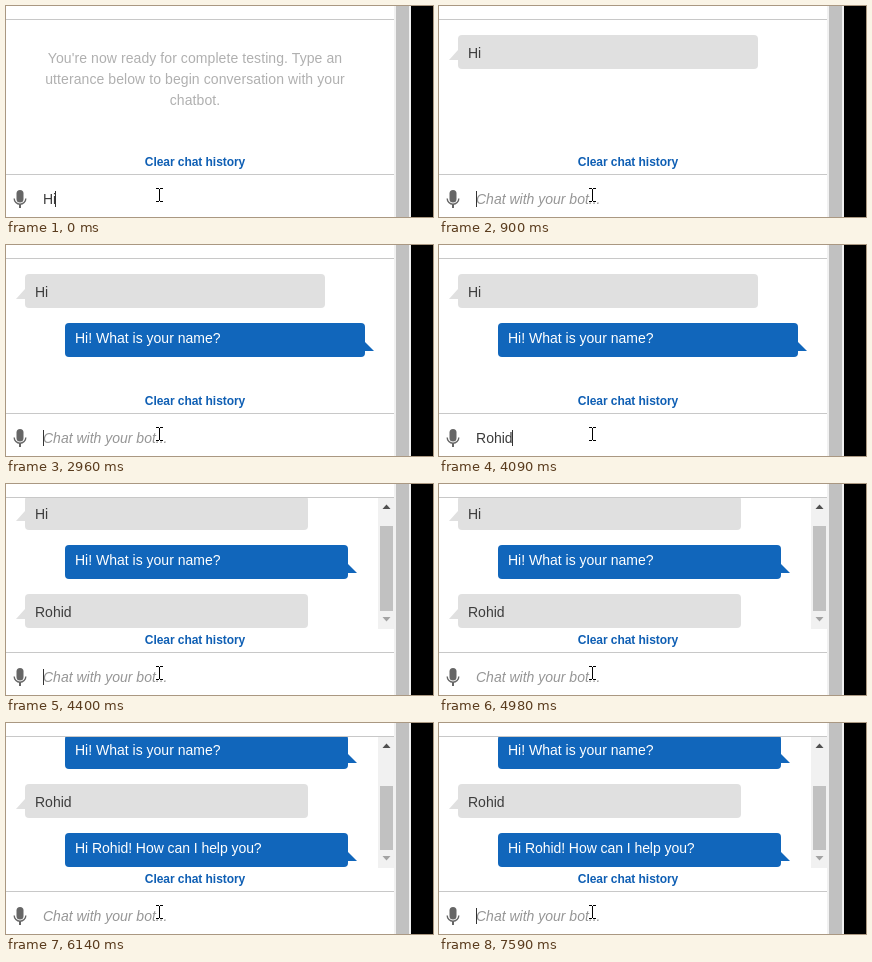
An HTML page that plays this animation: 427x211 px, repeating every 8 s.

```html
<!DOCTYPE html>
<html lang="en">
<head>
<meta charset="utf-8">
<title>Chat test</title>
<style>
html, body { margin: 0; width: 100%; height: 100%; overflow: hidden; background: #fff; }
body { position: relative; font: 14px/16px Arial, "Liberation Sans", sans-serif; color: #3c3c3c; }
div, svg { position: absolute; }
.anim { animation: 8s step-end infinite; }

.rule { left: 0; width: 388px; height: 1px; background: #c8c8c8; }
.intro { left: 0; top: 42px; width: 378px; line-height: 21px; text-align: center; color: #b0b0b0; letter-spacing: .08px; animation-name: until900; }
.link { left: 0; top: 149px; width: 378px; text-align: center; font-size: 12px; line-height: 14px; font-weight: bold; color: #0f5fb4; letter-spacing: -.05px; }

/* conversation */
.view { left: 0; top: 14px; width: 388px; height: 131px; overflow: hidden; }
.list { left: 0; top: -14px; width: 388px; height: 230px; animation-name: scroll; }
.msg { height: 34px; border-radius: 4px; white-space: nowrap; text-indent: 10px; }
.msg::after { content: ""; position: absolute; width: 9px; background: inherit; }
.user { left: 19px; right: 69px; background: #e0e0e0; line-height: 36px; }
.user::after { right: 100%; top: 15px; height: 10px; clip-path: polygon(100% 0, 100% 100%, 0 100%); }
.bot { left: 59px; right: 29px; background: #1166bb; color: #fff; line-height: 30px; }
.bot::after { left: 100%; top: 19px; height: 9px; clip-path: polygon(0 0, 100% 100%, 0 100%); }
.m1 { top: 29px; animation-name: from900; }
.m2 { top: 78px; animation-name: from2080; }
.m3 { top: 127px; animation-name: from4400; }
.m4 { top: 176px; letter-spacing: -.06px; animation-name: from4400; }

/* scrollbars */
.bar { left: 372px; top: 0; width: 16px; height: 131px; background: #f1f1f1; animation-name: from4400; }
.thumb { left: 2px; top: 28px; width: 13px; height: 85px; background: #c1c1c1; transform-origin: bottom; animation-name: thumb; }
.page { left: 388px; top: 0; width: 17px; height: 100%; background: #f1f1f1; }
.page::after { content: ""; position: absolute; left: 2px; width: 13px; height: 100%; background: #c1c1c1; }
.edge { left: 405px; right: 0; top: 0; bottom: 0; background: #000; }

/* input */
.field { left: 37px; top: 185px; white-space: nowrap; }
.hint { font-style: italic; color: #969696; animation-name: hint; }
.hi { animation-name: until900; }
.k1 { animation-name: k1; }
.k2 { animation-name: k2; }
.k3 { animation-name: k3; }
.k4 { animation-name: k4; }
.caret { left: 0; top: 185px; width: 1px; height: 16px; background: #333; animation-name: blink, move; }

@keyframes until900 { 0% { opacity: 1 } 11.25%, 100% { opacity: 0 } }
@keyframes from900 { 0% { opacity: 0 } 11.25%, 100% { opacity: 1 } }
@keyframes from2080 { 0% { opacity: 0 } 26%, 100% { opacity: 1 } }
@keyframes from4400 { 0% { opacity: 0 } 55%, 100% { opacity: 1 } }
@keyframes hint { 0% { opacity: 0 } 11.25% { opacity: 1 } 44.125% { opacity: 0 } 55%, 100% { opacity: 1 } }
@keyframes k1 { 0% { opacity: 0 } 44.125% { opacity: 1 } 55%, 100% { opacity: 0 } }
@keyframes k2 { 0% { opacity: 0 } 46% { opacity: 1 } 55%, 100% { opacity: 0 } }
@keyframes k3 { 0% { opacity: 0 } 49.5% { opacity: 1 } 55%, 100% { opacity: 0 } }
@keyframes k4 { 0% { opacity: 0 } 51.125% { opacity: 1 } 55%, 100% { opacity: 0 } }
@keyframes scroll {
  0% { width: 388px; transform: none }
  55% { width: 371px; transform: translateY(-17px) }
  63.75%, 100% { width: 371px; transform: translateY(-66px) }
}
@keyframes thumb { 0% { transform: none } 63.75%, 100% { transform: scaleY(.753) } }
@keyframes blink {
  0%, 11.25%, 24.125%, 37%, 55%, 69.25%, 82.25%, 94.875%, 100% { opacity: 1 }
  9.375%, 16.625%, 29.5%, 62.25%, 76.75%, 89.5% { opacity: 0 }
}
@keyframes move {
  0% { transform: translateX(49px) }
  11.25% { transform: translateX(37px) }
  44.125% { transform: translateX(46px) }
  46% { transform: translateX(54px) }
  49.5% { transform: translateX(65px) }
  51.125% { transform: translateX(73px) }
  55%, 100% { transform: translateX(37px) }
}
</style>
</head>
<body>
<div class="rule" style="top:13px"></div>
<div class="rule" style="top:168px"></div>

<div class="anim intro">You're now ready for complete testing. Type an<br>utterance below to begin conversation with your<br>chatbot.</div>

<div class="view">
  <div class="anim list">
    <div class="anim msg user m1">Hi</div>
    <div class="anim msg bot m2">Hi! What is your name?</div>
    <div class="anim msg user m3">Rohid</div>
    <div class="anim msg bot m4">Hi Rohid! How can I help you?</div>
  </div>
  <div class="anim bar">
    <div class="anim thumb"></div>
    <svg width="16" height="131">
      <path d="M4.5 11 8.5 6.5 12.5 11z" fill="#505050"/>
      <path d="M4.5 119 8.5 123.5 12.5 119z" fill="#a3a3a3"/>
    </svg>
  </div>
</div>

<div class="link">Clear chat history</div>

<div class="anim field hint">Chat with your bot...</div>
<div class="anim field hi">Hi</div>
<div class="field"><span class="anim k1">R</span><span class="anim k2">o</span><span class="anim k3">hi</span><span class="anim k4">d</span></div>
<div class="anim caret"></div>

<svg style="left:0;top:176px" width="170" height="35">
  <g fill="none" stroke="#666">
    <rect x="10.5" y="8" width="7" height="12.5" rx="3.5" fill="#666" stroke="none"/>
    <path d="M8.2 16.5a5.8 5.8 0 0 0 11.6 0" stroke-width="1.4"/>
    <path d="M14 22v4" stroke-width="2"/>
  </g>
  <path d="M150 6.5h3M154 6.5h3M153.5 7v12M150 19.5h3M154 19.5h3" fill="none" stroke="#000"/>
</svg>

<div class="page"></div>
<div class="edge"></div>
</body>
</html>
```
